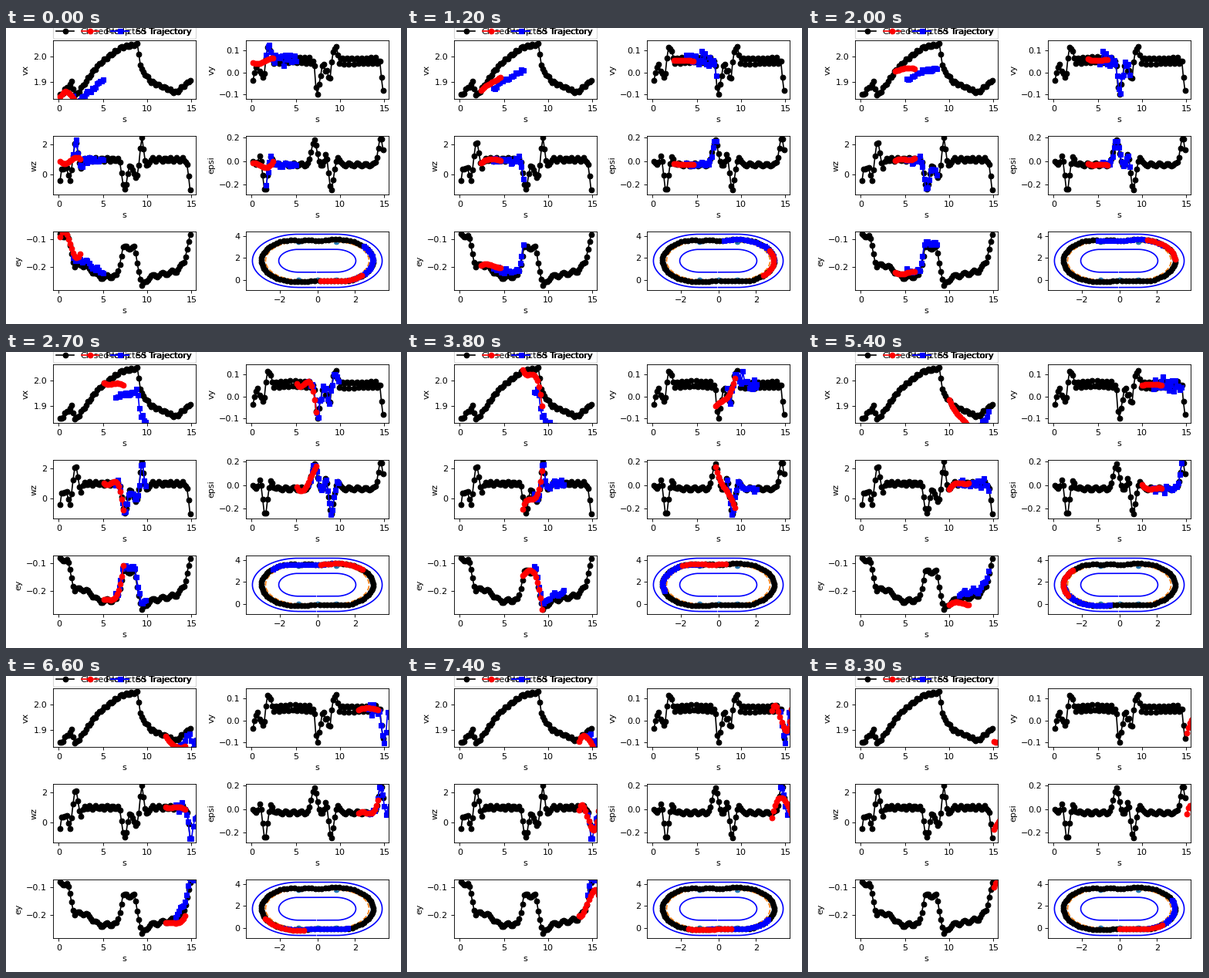
Animation, 512 px wide and 384 px high, one loop 8.4 s. Source, as a matplotlib script:

```python
import numpy as np
import matplotlib.pyplot as plt
from matplotlib.animation import FuncAnimation

W, H, DPI = 512, 384, 80
FRAMES, STEP_MS = 84, 100
LAP, STRAIGHT, RADIUS, HALF_WIDTH = 15.0, 1.0, 1.75, 0.7
HORIZON, SET_SIZE = 13, 20

# name, column, row, y limits, y ticks
PANELS = [("vx", 0, 0, (1.833, 2.0635), (1.9, 2.0)),
          ("vy", 1, 0, (-.1195, .1455), (-.1, 0, .1)),
          ("wz", 0, 1, (-1.29, 2.53), (0, 2)),
          ("epsi", 1, 1, (-.286, .214), (-.2, 0, .2)),
          ("ey", 0, 2, (-.2835, -.0725), (-.2, -.1))]


def wave(s, size, period, start=0):
    return size * np.sin(2 * np.pi * (s - start) / period)


def bumps(s, *parts):
    """Bell curves (centre, width, height), the same in both halves of the lap."""
    half = LAP / 2
    total = 0
    for centre, width, height in parts:
        d = (s - centre + half / 2) % half - half / 2
        total = total + height * np.exp(-d ** 2 / (2 * width ** 2))
    return total


def through(s, *points):
    x, y = np.array(points).T
    return np.interp(s, x, y, period=LAP)


# gain scales how strongly the swings at the bends show
def vx(s, gain=1):
    return wave(s, .005, .62) + through(
        s, (.1, 1.843), (1.5, 1.9), (1.75, 1.852), (2.05, 1.85), (3.2, 1.91), (4.6, 1.972),
        (7.1, 2.038), (8.9, 2.048), (9.3, 1.95), (10.5, 1.9), (13.2, 1.858), (14.85, 1.908))


def vy(s, gain=1):
    return .055 + wave(s, .016, .53) + gain * bumps(
        s, (-.05, .22, -.155), (.75, .3, -.03), (1.25, .17, -.08), (1.95, .18, .07))


def wz(s, gain=1):
    return 1 + wave(s, .12, .65, .1) + gain * bumps(
        s, (-.07, .25, -2.05), (.7, .25, -.5), (1.24, .2, -1.25), (1.9, .17, 1.3),
        (2.5, .15, -.5))


def epsi(s, gain=1):
    return -.03 + wave(s, .012, .9) + gain * bumps(
        s, (-.45, .27, .22), (.9, .15, .08), (1.52, .22, -.22), (2.25, .17, .07))


def ey(s, gain=1):
    return wave(s, .006, 1.05, 7.2) + through(
        s, (.1, -.088), (.95, -.085), (1.75, -.195), (2.9, -.193), (4.6, -.236), (6.6, -.232),
        (7.25, -.13), (8.55, -.13), (9.4, -.27), (10.3, -.235), (13.2, -.215), (14.1, -.185),
        (14.85, -.088))


STATES = [vx, vy, wz, epsi, ey]


def progress(i):
    return .18 + .179 * i + .13 * np.sin(np.pi * i / 83)


def track_xy(s, off):
    """Map distance along the oval and lateral offset to the plane."""
    s = np.asarray(s, float) % LAP
    arc = np.pi * RADIUS
    a = np.clip((s - STRAIGHT) / RADIUS, 0, np.pi)
    b = np.clip((s - 3 * STRAIGHT - arc) / RADIUS, 0, np.pi)
    x = (np.minimum(s, STRAIGHT) - np.clip(s - STRAIGHT - arc, 0, 2 * STRAIGHT)
         + np.clip(s - 3 * STRAIGHT - 2 * arc, 0, None))
    r = RADIUS - off
    return x + r * np.sin(a + b), RADIUS - r * np.cos(a + b)


lap_s = progress(np.arange(83)) - .03
lap = [f(lap_s) for f in STATES]

# Safe set: a slower, slightly noisy lap
rng = np.random.default_rng(4)
set_s = .05 + .178 * np.arange(120) + rng.uniform(-.03, .03, 120)
safe = [f(set_s) + rng.normal(0, noise, 120)
        for f, noise in zip(STATES, (.004, .016, .1, .011, .003))]
safe[0] -= .093 * np.abs(np.sin(np.pi * set_s / 16))
safe[4] += .018

tau = np.linspace(0, 1, HORIZON)


def predict(s0):
    """Smooth cubic forecast of each state, with less speed and a lateral drift."""
    s = s0 + 2.2 * tau
    gain = np.clip(s0 / 5, .25, 1)
    plans = [np.polyval(np.polyfit(tau, f(s, gain), 3), tau) for f in STATES]
    plans[0] -= .055 * tau
    plans[4] += .035 * tau * np.cos(np.pi * s0 / 13)
    return s, plans


fig = plt.figure(figsize=(W / DPI, H / DPI), dpi=DPI)
safe_lines, plan_lines = [], []


def add_panel(col, row):
    left, top = (61, 311)[col], 16 + 124 * row
    return fig.add_axes([left / W, 1 - (top + 76) / H, 185 / W, 76 / H])


def add_lines(ax, x, y):
    black, = ax.plot(x, y, "-ok")
    blue, = ax.plot([], [], "-sb")
    red, = ax.plot([], [], "-or")
    safe_lines.append(blue)
    plan_lines.append(red)
    return black, red, blue


def add_key(ax, handle, label, x, **style):
    key = ax.legend([handle], [label], bbox_to_anchor=(x, 1.02, 1, .2), loc="lower left",
                    borderaxespad=0, **style)
    ax.add_artist(key)
    key.set_clip_on(False)


for n, (name, col, row, ylim, yticks) in enumerate(PANELS):
    ax = add_panel(col, row)
    black, red, blue = add_lines(ax, lap_s, lap[n])
    ax.set(xlim=(-.64, 15.48), ylim=ylim, xticks=(0, 5, 10, 15), yticks=yticks,
           xlabel="s", ylabel=name)
    if n == 0:
        add_key(ax, black, "Closed-loop", 0, mode="expand")
        add_key(ax, red, "Predicted Trajectory", .174, frameon=False)
        add_key(ax, blue, "SS Trajectory", .384, frameon=False)

ax = add_panel(1, 2)
grid = np.arange(150) * .1
arc = np.pi * RADIUS
ax.plot(*track_xy([0, 1, 1 + arc, 3 + arc, 3 + 2 * arc], 0), "o")
ax.plot(*track_xy(grid, 0), "--")
for side in (-HALF_WIDTH, HALF_WIDTH):
    ax.plot(*track_xy(grid, side), "-b")
add_lines(ax, *track_xy(lap_s, lap[4]))
ax.set(xlim=(-3.795, 3.795), ylim=(-.945, 4.445), xticks=(-2, 0, 2), yticks=(0, 2, 4))


def update(i):
    s0 = progress(i)
    first = np.searchsorted(set_s, s0 + 1.4 - .03 * s0)
    part = slice(first, first + SET_SIZE)
    plan_s, plans = predict(s0)
    for n in range(5):
        safe_lines[n].set_data(set_s[part], safe[n][part])
        plan_lines[n].set_data(plan_s, plans[n])
    safe_lines[5].set_data(*track_xy(set_s[part], safe[4][part]))
    plan_lines[5].set_data(*track_xy(plan_s, plans[4]))
    return safe_lines + plan_lines


anim = FuncAnimation(fig, update, frames=FRAMES, interval=STEP_MS, repeat=True,
                     repeat_delay=0, init_func=lambda: update(0))
plt.show()
```
